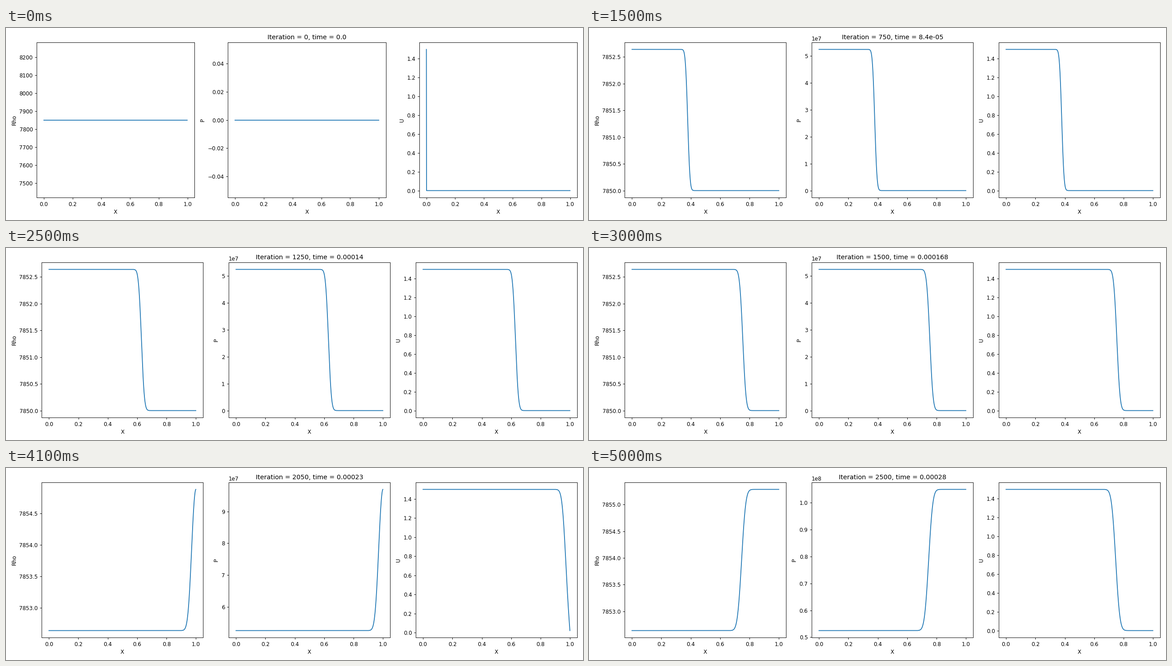
Animation, 1280 px wide and 427 px high, one loop 5100 ms. Source, as a matplotlib script:

```python
"""Pressure wave in a steel bar: driven from the left, reflected by a rigid wall."""
from math import erf, sqrt

import matplotlib.pyplot as plt
import numpy as np
from matplotlib.animation import FuncAnimation

DPI = 1280 / 15
LAYOUT_DPI = 100  # margins are measured with text at this resolution
FRAMES, INTERVAL = 51, 100
STEPS_PER_FRAME = 50

CELLS = 1000
DX = 1 / CELLS
RHO0, BULK, U0 = 7850.0, 1.56e11, 1.5
C = sqrt(BULK / RHO0)
DT = 0.5 * DX / C
SMEAR = 0.2  # front variance gained per step, in cells squared
LEAD = 4     # cells the front is ahead of the ideal wave

x = np.arange(CELLS) * DX
verf = np.vectorize(erf)


def step_down(z):
    """Smooth step given by the normal distribution."""
    return 0.5 * (1 + verf(z / sqrt(2)))


def state(n):
    """Density, pressure and velocity after n steps."""
    if n == 0:
        u = np.zeros(CELLS)
        u[0] = U0
        return np.full(CELLS, RHO0), np.zeros(CELLS), u
    front = (0.5 * n + LEAD) * DX
    width = sqrt(SMEAR * n) * DX
    direct = step_down((front - x) / width)
    echo = step_down((front - 2 + x) / width)
    p = RHO0 * C * U0 * (direct + echo)
    return RHO0 + p / C**2, p, U0 * (direct - echo)


# The tiny extra height keeps the pixel count from truncating to 426.
fig, axes = plt.subplots(1, 3, figsize=(15, 427.001 / DPI), dpi=DPI)
lines = []
for ax, name in zip(axes, ("Rho", "P", "U")):
    ax.set_xlabel("X")
    ax.set_ylabel(name)
    lines += ax.plot(x, np.zeros(CELLS))


def fit_layout():
    dpi = fig.dpi
    fig.set_dpi(LAYOUT_DPI)
    fig.tight_layout()
    fig.set_dpi(dpi)


def update(i):
    n = i * STEPS_PER_FRAME
    for ax, line, values in zip(axes, lines, state(n)):
        line.set_ydata(values)
        ax.relim()
        ax.autoscale_view()
    axes[1].set_title(f"Iteration = {n}, time = {round(n * DT, 6)}")
    fit_layout()
    return lines


anim = FuncAnimation(fig, update, frames=FRAMES, interval=INTERVAL,
                     init_func=lambda: lines, repeat=True, repeat_delay=0)
plt.show()
```
